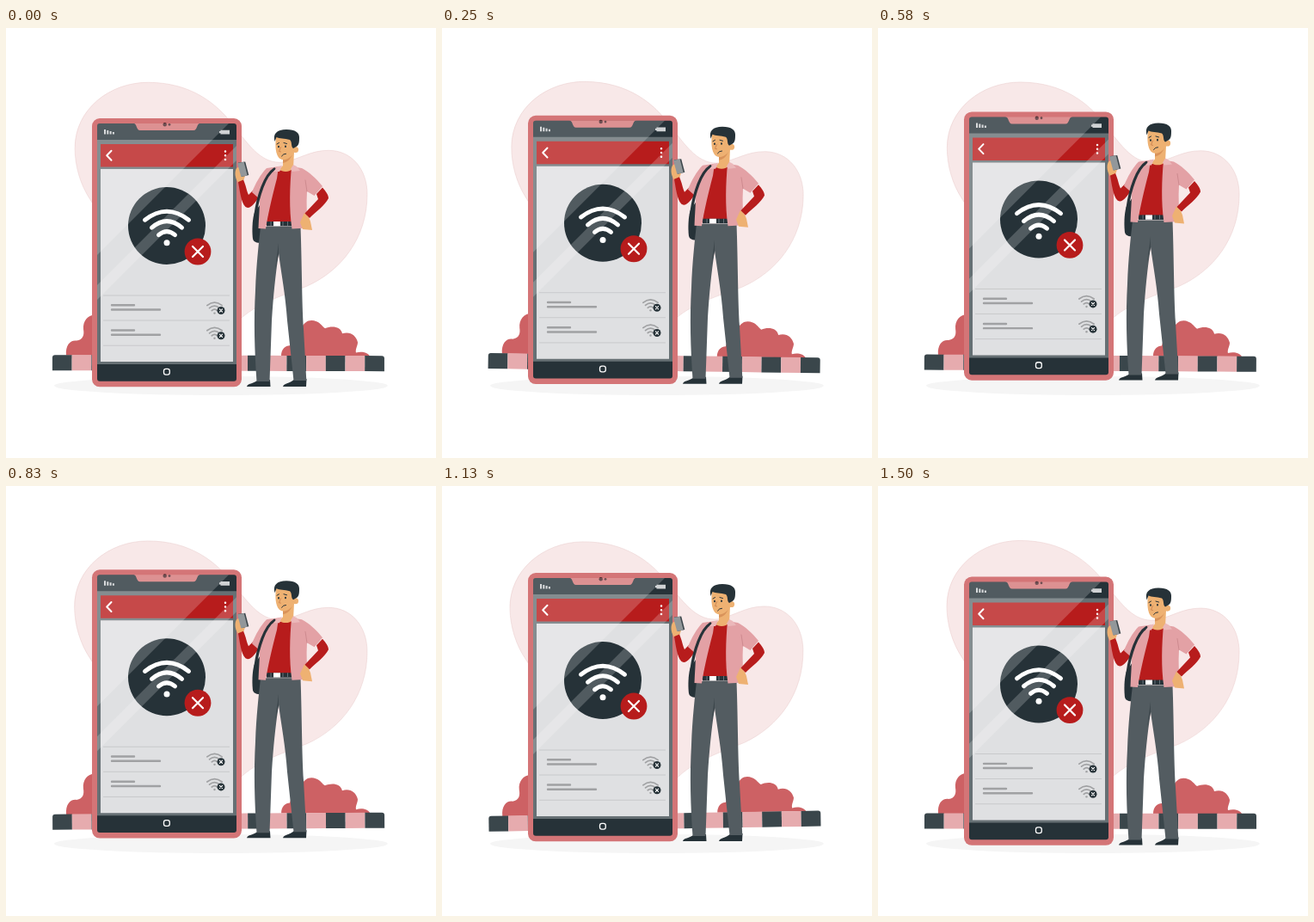
These frames come from a looping animation (500 px wide and 500 px high, 1540 ms). An HTML page:

```html
<!DOCTYPE html>
<html lang="en">
<head>
<meta charset="utf-8">
<title>No connection</title>
<style>
  html, body { margin: 0; width: 100%; height: 100%; overflow: hidden; background: #fff; }
  svg { display: block; width: 100%; height: 100%; }
  .dark { fill: #263238; }
  .red { fill: #b71c1c; }
  .pink { fill: #e3a1a5; }
  .skin { fill: #eeb172; }
  .line { fill: none; stroke-linecap: round; stroke-linejoin: round; }
  .white { stroke: #fff; }
</style>
</head>
<body>
<svg viewBox="0 0 500 500">
  <defs>
    <g id="wifi" class="line" stroke-width="5">
      <path d="M-25.5-26.5Q0-46.5 25.5-26.5M-17.5-17.5Q0-32.5 17.5-17.5M-9.5-9Q0-17 9.5-9"/>
      <path d="M0 0h.01" stroke-width="7"/>
    </g>
    <g id="row">
      <path class="line" stroke="#a0a1a3" stroke-width="2.4" d="M123 322.3h26M123 327.5h56"/>
      <use href="#wifi" stroke="#a0a1a3" transform="translate(242.5 331.6) scale(.34)"/>
      <circle class="dark" cx="250" cy="328.5" r="4.5"/>
      <path class="line white" stroke-width="1.1" d="M248.4 326.9l3.2 3.2m0-3.2l-3.2 3.2"/>
    </g>
  </defs>

  <path id="blob" fill="#f8e8e8" stroke="#ecd0d1" stroke-width=".6" d="M80 140C80 95 120 63.5 165 63.5C215 63.5 245 88 264 113C284 139 298 158 322 156C342 152 354 142 375 142C402 142 420 164 420 193C420 244 390 282 350 300C315 313 290 322 272 339L200 330C150 270 120 235 98 200C86 182 80 160 80 140Z"/>
  <ellipse cx="250" cy="416" rx="194" ry="11" fill="#f5f5f5"/>

  <g id="street">
    <path fill="#cd6164" d="M70 381C69 369 75 363 82 364C90 363 91 357 90 351C89 341 95 334 103 334L120 340V381Z
      M320 381C320 373 325 369 330 369C332 359 340 354 343 350C347 340 354 338 361 341C366 343 368 347 371 349C378 346 389 346 391 355C400 352 407 357 409 365C409 369 406 373 407 377C414 375 421 377 423 381Z"/>
    <g id="kerb"></g>
  </g>

  <g id="floating">
    <rect x="100" y="105" width="174" height="312.3" rx="9" fill="#d47577"/>
    <rect x="106" y="111" width="162" height="299.7" rx="3" class="dark"/>
    <path fill="#667074" d="M106 130h162v261h-162z"/>
    <path class="red" d="M110 135h154v26.5h-154z"/>
    <path fill="#dfe0e2" d="M110 164h154v224h-154z"/>
    <path fill="#d47577" d="M148 110.5h78c-5 1-3 8.5-8 8.5h-62c-5 0-3-7.5-8-8.5z"/>
    <g fill="#4a2428"><circle cx="184.7" cy="112.3" r="2.2"/><circle cx="190" cy="112.3" r="1.4"/></g>
    <path fill="#cfd2d4" d="M114 118h2v5.5h-2zM117.3 119h2v4.5h-2zM120.6 120h2v3.5h-2zM123.9 121h2v2.5h-2zM248 120h1.5v-1.3h10.5v4.8h-10.5v-1.3h-1.5z"/>
    <circle class="dark" cx="187" cy="230" r="45"/>
    <path fill="#fff" fill-opacity=".2" d="M109 111H259L106 264V114Q106 111 109 111ZM268 137V154L106 316V299Z"/>
    <path class="line white" stroke-width="2" d="M122.5 142.7l-5.3 5.5 5.3 5.5"/>
    <path class="line white" stroke-width="2.5" d="M255 143.5h.01m0 4.8h.01m0 4.7h.01"/>
    <use href="#wifi" class="white" x="187" y="249.7"/>
    <circle class="red" cx="223" cy="260" r="15.4"/>
    <path class="line white" stroke-width="2.2" d="M217 254l12 12m0-12l-12 12"/>
    <path stroke="#c8c9cb" d="M113 311h147M113 340h147M113 369.2h147"/>
    <use href="#row"/>
    <use href="#row" y="29.2"/>
    <rect x="183.5" y="396.3" width="6.8" height="6.8" rx="2.4" class="line white" stroke-width="1.3"/>

    <!-- bag, legs and shoes -->
    <path class="dark" d="M290 213C286 219 286 238 287 245C288 250 294 250 299 250L303 208L295 206Z"/>
    <path class="dark" d="M280 417C281 413 287 414 294 409H307L307.500 417ZM322 417C323 413 329 414 336 408H349.500L349 417Z"/>
    <path fill="#535c61" d="M296 231H342.500C344 270 344 320 346 350L349.300 410H334.500L327 340C325 310 320 285 317 262C313 290 311 310 309 340L306.500 411H291.500C289 375 288 340 290 305C291 275 294 250 296 231Z"/>
    <path fill="#3d474c" d="M317 250L313 281L317 263Z"/>

    <!-- raised arm with a handset -->
    <path class="skin" d="M268 163C265 168 267 176 270 180L276 178L279 169L273 160Z"/>
    <path fill="#3d474c" d="M270 156.600L278.200 155.500L282.300 171L274 173Z"/>
    <path fill="#92979a" d="M269 157L276.700 155.800L280.700 171.400L273.300 173Z"/>
    <path class="red" d="M270 179L276 176.500C279 183 280 190 282 194L289 187L295 196C290 202 286 209 281 209C274 208 272 190 270 179Z"/>

    <!-- torso -->
    <path class="red" d="M314 166L333 164L334 229H302Z"/>
    <path class="dark" d="M303 225h30v5.500h-30z"/>
    <path fill="#fff" d="M311 225h8v5.300h-8z"/>
    <path stroke="#66737a" d="M308 225v5M322 225v5M327.500 225v5"/>
    <path class="pink" d="M303 163L317 161L315 175C309 198 305 215 302 233.500L293.500 233C294 220 295 209 295 199L286 191C290 181 296 170 303 163Z"/>
    <path class="pink" d="M332 161L344 163C352 167 361 175 368 184L358.500 195L350 190C349 205 350 219 351 232.500L332.500 233.500C329 210 330 184 332 161Z"/>
    <path class="line" stroke="#c8858a" stroke-width=".8" d="M295 198L299 186M350 190L348 177"/>
    <path class="line" stroke="#263238" stroke-width="3.200" d="M312 164C301 171 293 195 290 217"/>

    <!-- arm on the hip -->
    <path class="skin" d="M347 215L352 220L354 225L356 235L345 234L342 226Z"/>
    <path class="red" d="M361 193L368 185.500C372 190 375 194 375 198C371 206 360 214 353 221L347.500 215.500L363 199Z"/>

    <!-- head -->
    <path class="skin" d="M322 149L335 144L334 163C330 168 321 168 318 164L322 160Z"/>
    <path fill="#d9935a" d="M322 153C328 152 331 148 333 146C332 152 327 156 322 157Z"/>
    <path fill="#ebb8ba" d="M321 160L316 161L311 167L318 167ZM334 159L338 161L342 166L333 167L331 164Z"/>
    <path class="skin" d="M314 127C313 135 313 143 316 149C318 153 322 154 325 153C331 151 334 147 335 143L337 127Z"/>
    <circle class="skin" cx="336.500" cy="141.500" r="3.600"/>
    <path class="dark" d="M312.500 132C310 123 315 118 326 118C337 118 341 122 341 127C341 132 341 136 337.500 138L334 140C331 138 333 132 330 130C324 128 318 129 314.500 127Z"/>
    <path class="dark" d="M316 138a1 1.300 0 1 0 2 0a1 1.300 0 1 0-2 0M324 137.700a1 1.300 0 1 0 2 0a1 1.300 0 1 0-2 0"/>
    <path class="line" stroke="#263238" stroke-width="1" d="M315 135l2.500-1.500M323 133.500l3.500 1M320.500 149q2-3 5-2.800"/>
    <path class="line" stroke="#cb8050" stroke-width=".9" d="M319.500 138.500l-2 5 2 .4"/>
  </g>
</svg>
<script>
  const LOOP = 1540, FRAMES = 37, LEAD = 55 / LOOP;
  const el = id => document.getElementById(id);
  const SEGMENTS = 17, SEGMENT = 386 / SEGMENTS;

  el("kerb").innerHTML = Array.from({ length: SEGMENTS }, (_, i) => {
    const x = 54 + i * SEGMENT;
    const edge = i === 0 ? `M${x} 398.700v-15q0-3 3-3h${SEGMENT - 3}v18z`
      : i === SEGMENTS - 1 ? `M${x} 398.700v-18h${SEGMENT - 3}q3 0 3 3v15z`
      : `M${x} 398.700v-18h${SEGMENT}v18z`;
    return `<path d="${edge}" fill="${i % 2 ? "#e6abae" : "#3a464b"}"/>`;
  }).join("");

  // Triangle wave: 0 at the start, 1 at the middle of the loop
  const triangle = p => 1 - Math.abs(1 - 2 * (p - Math.floor(p)));
  const lift = p => -10 * triangle(p);
  const sway = p => 2 * triangle(p + .25) - 1;

  function draw(now) {
    const frame = Math.floor(now % LOOP / LOOP * FRAMES + .1) % FRAMES;
    const phase = frame / FRAMES + LEAD;
    const angle = sway(phase);
    el("floating").setAttribute("transform", `translate(0 ${lift(phase) - lift(LEAD)})`);
    el("blob").setAttribute("transform", `rotate(${angle} 250 202)`);
    el("street").setAttribute("transform", `rotate(${angle} 247 366)`);
    requestAnimationFrame(draw);
  }
  draw(performance.now());
</script>
</body>
</html>
```
